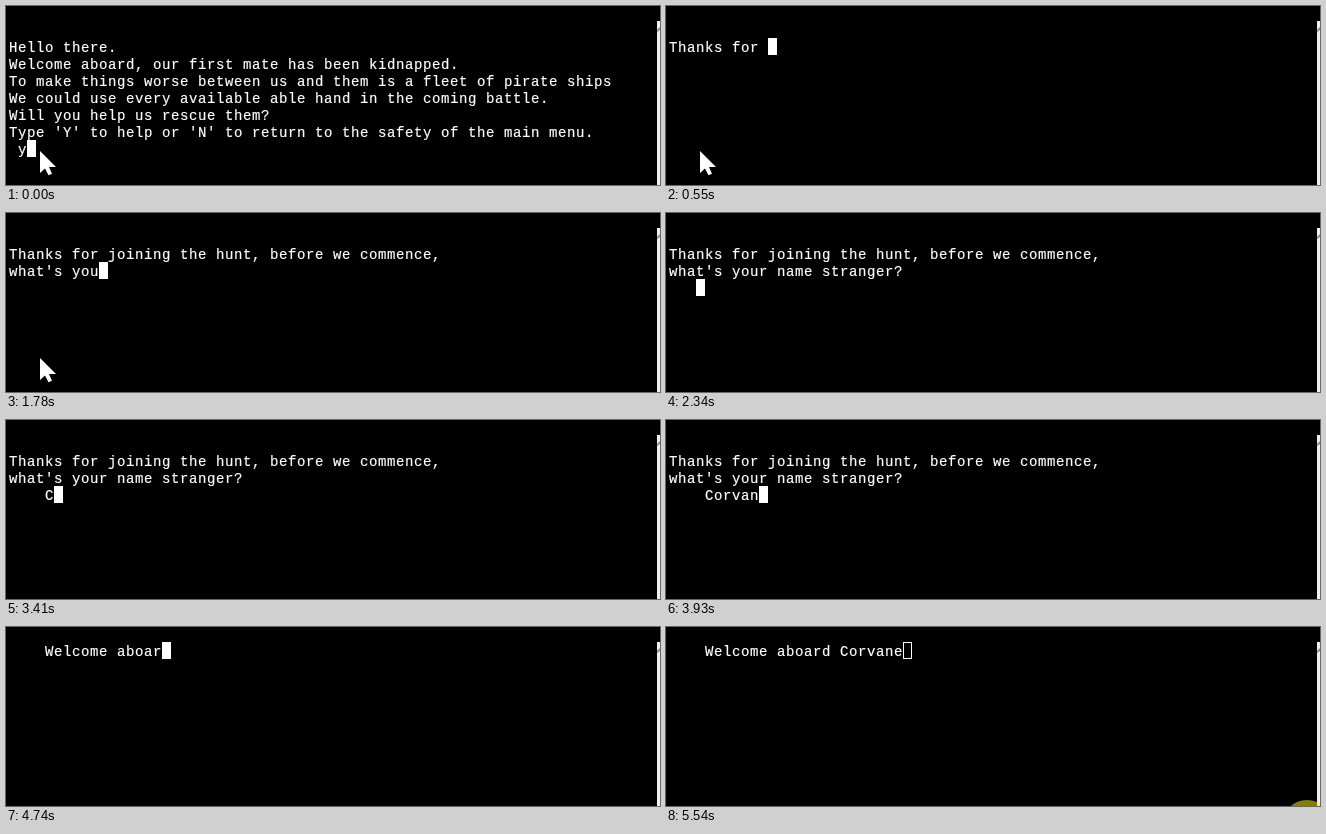
Write an HTML page that moves like this. It is 654 by 179 pixels and loops after 5.61 s.

```html
<!DOCTYPE html>
<html lang="en">
<head>
<meta charset="utf-8">
<title>Terminal story</title>
<style>
  html, body { margin: 0; width: 100%; height: 100%; overflow: hidden; background: #000; }
  svg { display: block; width: 654px; height: 179px; }
  text {
    font: 14px "Liberation Mono", "Courier New", monospace;
    letter-spacing: .6px; white-space: pre;
    fill: #fff; stroke: #fff; stroke-width: .2px;
  }
</style>
</head>
<body>
<svg viewBox="0 0 654 179">
  <rect width="654" height="179"/>
  <g id="lines"></g>
  <rect id="caret" width="9" height="17" fill="#fff"/>
  <rect id="hollow" width="8" height="16" fill="none" stroke="#fff"/>
  <rect x="651" y="15" width="3" height="164" fill="#f0f0f0"/>
  <path d="M651 26V24L654 21V24Z" fill="#8a8a8a"/>
  <path id="pointer" d="M0 0V22L5 17.5L8.5 24.2L12 22.7L9 16H16Z" fill="#fff"/>
  <circle id="halo" cy="197.5" r="24.5" fill="#ffee00" fill-opacity=".53"/>
</svg>
<script>
const LOOP = 5610, TICK = 70, COL = 9, ROW = 17, LEFT = 3, TOP = 15, BASE = 14;
const $ = id => document.getElementById(id);

const intro = [
  "", "Hello there.",
  "Welcome aboard, our first mate has been kidnapped.",
  "To make things worse between us and them is a fleet of pirate ships",
  "We could use every available able hand in the coming battle.",
  "Will you help us rescue them?",
  "Type 'Y' to help or 'N' to return to the safety of the main menu.",
  " y"
];
const thanks = "Thanks for joining the hunt, before we commence,";
const ask = "what's your name stranger?";
const player = "Corvane";
const reply = "    Welcome aboard " + player;

// Each step holds a whole screen: its start, its lines and the caret cell.
const steps = [];
const show = (at, lines, caret) => steps.push({ at, lines, caret });

// Types the last line of a screen; counts are the letters shown at each tick.
function type(at, before, line, counts) {
  counts.forEach((n, i) =>
    show(at + i * TICK, [...before, line.slice(0, n)], [n, before.length]));
}

const first = ["", thanks], both = [...first, ask];

show(0, intro, [2, 7]);
show(200, [], null);
type(270, [""], thanks, [0, 2, 5, 8, 11]);
type(670, [""], thanks, [15, 18, 21, 24, 28, 31, 34, 37, 41, 44, 47]);
show(1440, first, [0, 2]);
type(1570, first, ask, [0, 3, 7, 10, 13, 16, 20, 23]);
show(2130, both, null);
type(2270, both, "    ", [2, 3, 4]);
[3410, 3610, 3730, 3860, 3930, 4060].forEach((at, i) => {
  const n = i < 3 ? i + 1 : i + 2;
  show(at, [...both, "    " + player.slice(0, n)], [4 + n, 3]);
});
show(4260, [], null);
type(4330, [], reply, [1, 4, 7, 10, 14, 17, 20]);
type(4810, [], reply, [23, 26]);

const rows = Array.from({ length: 8 }, (_, i) => {
  const row = document.createElementNS("http://www.w3.org/2000/svg", "text");
  row.setAttribute("x", LEFT);
  row.setAttribute("y", TOP + i * ROW + BASE);
  $("lines").append(row);
  return row;
});

const visible = (el, on) => el.setAttribute("visibility", on ? "visible" : "hidden");

function draw(t) {
  const { lines, caret } = steps.findLast(s => s.at <= t);
  rows.forEach((row, i) => {
    const line = lines[i] || "";
    if (row.textContent !== line) row.textContent = line;
  });

  const focused = t < 5540;
  visible($("caret"), caret && focused);
  visible($("hollow"), caret && !focused);
  if (caret) {
    const x = LEFT + caret[0] * COL, y = TOP + caret[1] * ROW;
    $("caret").setAttribute("x", x);
    $("caret").setAttribute("y", y);
    $("hollow").setAttribute("x", x + 0.5);
    $("hollow").setAttribute("y", y + 0.5);
  }

  visible($("pointer"), t < 2270);
  $("pointer").setAttribute("transform",
    t < 2130 ? "translate(34 145)" : "translate(119 125)");

  visible($("halo"), t >= 5010);
  $("halo").setAttribute("cx", focused ? 640 : 641);
}

function frame() {
  draw(performance.now() % LOOP);
  requestAnimationFrame(frame);
}
frame();
</script>
</body>
</html>
```
